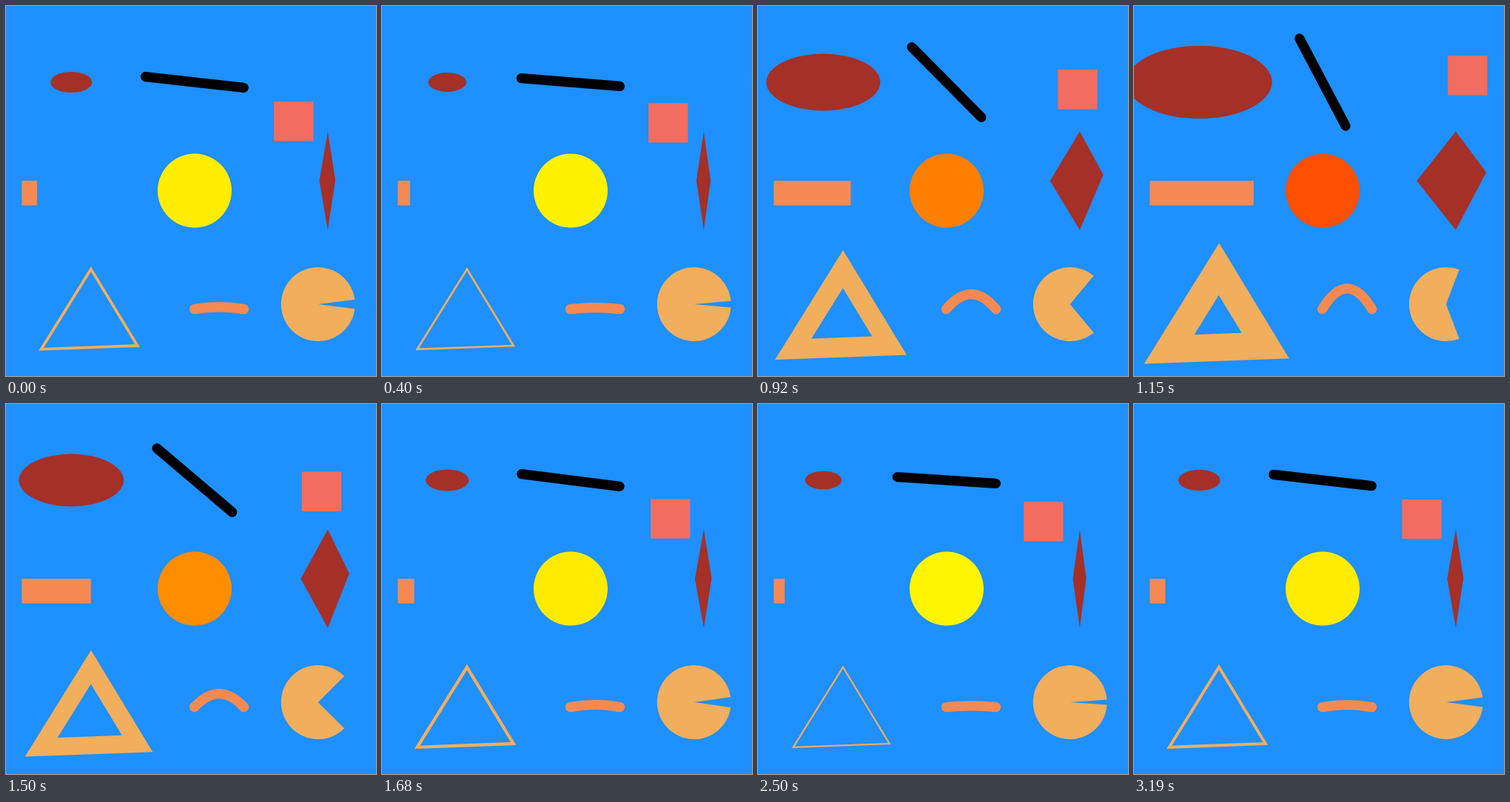
Recreate the animation shown at these times as an HTML page with a canvas. Size 500 by 500 pixels, loop 3290 ms.

```html
<!DOCTYPE html>
<html lang="en">
<head>
<meta charset="utf-8">
<title>Shapes</title>
<style>
  html, body { margin: 0; width: 100%; height: 100%; overflow: hidden; background: #1e90ff; }
  canvas { display: block; }
</style>
</head>
<body>
<canvas id="stage" width="500" height="500"></canvas>
<script>
const ctx = document.getElementById('stage').getContext('2d');
const LOOP = 3290, STEP = 58, LAST = 55;
const BROWN = '#a53027', CORAL = '#f26d60', ORANGE = '#f48a52', SAND = '#f1ae5d';

// [step, level]: one level drives every shape
const keys = [
  [0, .0713], [5, .042], [10, .065], [13, .147], [18, .74], [20, .691], [26, .448],
  [29, .08], [35, .052], [38, .046], [43, .041], [48, .068], [52, .084], [55, .0737]
];

function levelAt(step) {
  const i = Math.max(1, keys.findIndex(k => k[0] >= step));
  const [s0, v0] = keys[i - 1], [s1, v1] = keys[i];
  return v0 + (v1 - v0) * (step - s0) / (s1 - s0);
}

function fill(color, trace) {
  ctx.beginPath();
  trace();
  ctx.fillStyle = color;
  ctx.fill();
}

function stroke(color, width, trace) {
  ctx.beginPath();
  trace();
  ctx.strokeStyle = color;
  ctx.lineWidth = width;
  ctx.stroke();
}

function polygon(...points) {
  points.forEach(p => ctx.lineTo(...p));
  ctx.closePath();
}

function draw(v) {
  ctx.fillStyle = '#1e90ff';
  ctx.fillRect(0, 0, 500, 500);
  ctx.lineCap = 'round';

  const rx = 20 + 113.4 * v;
  fill(BROWN, () => ctx.ellipse(88.2, 103, rx, rx / 2, 0, 0, 7));

  const turn = v * Math.PI / 2;
  const dx = 66.7 * Math.cos(turn), dy = 66.7 * Math.sin(turn);
  stroke('#000', 13.3, () => {
    ctx.moveTo(254.8, 103 - dy);
    ctx.moveTo(254.8 - dx, 103 - dy);
    ctx.lineTo(254.8 + dx, 103 + dy);
  });

  fill(CORAL, () => ctx.rect(355 + 100 * v, 136.4 - 100 * v, 53.3, 53.3));
  fill(ORANGE, () => ctx.rect(21.4, 236.2, 6.7 + 193.3 * v, 33.3));
  fill(`rgb(255,${Math.round(255 * (1 - v))},0)`, () => ctx.arc(254.9, 249.6, 50, 0, 7));

  fill(BROWN, () => polygon(
    [434.8, 169.5], [441.5 + 50 * v, 236.5 - 17 * v], [434.8, 302.8], [428.2 - 66.7 * v, 236.3]
  ));

  stroke(SAND, 53.3 * v, () => polygon([114.8, 355.6], [47.6, 463.8], [177.6, 459]));

  stroke(ORANGE, 13.3, () => {
    ctx.moveTo(254.5, 409.6);
    ctx.quadraticCurveTo(288, 409.6 - 80 * v, 321.5, 409.6);
  });

  const mouth = v * 100 * Math.PI / 180;
  fill(SAND, () => {
    ctx.moveTo(421.7, 403);
    ctx.arc(421.7, 403, 50, mouth, -mouth);
  });
}

function frame() {
  const t = performance.now() % LOOP;
  draw(levelAt(Math.min(LAST, Math.floor((t + 12) / STEP))));
  requestAnimationFrame(frame);
}
frame();
</script>
</body>
</html>
```
